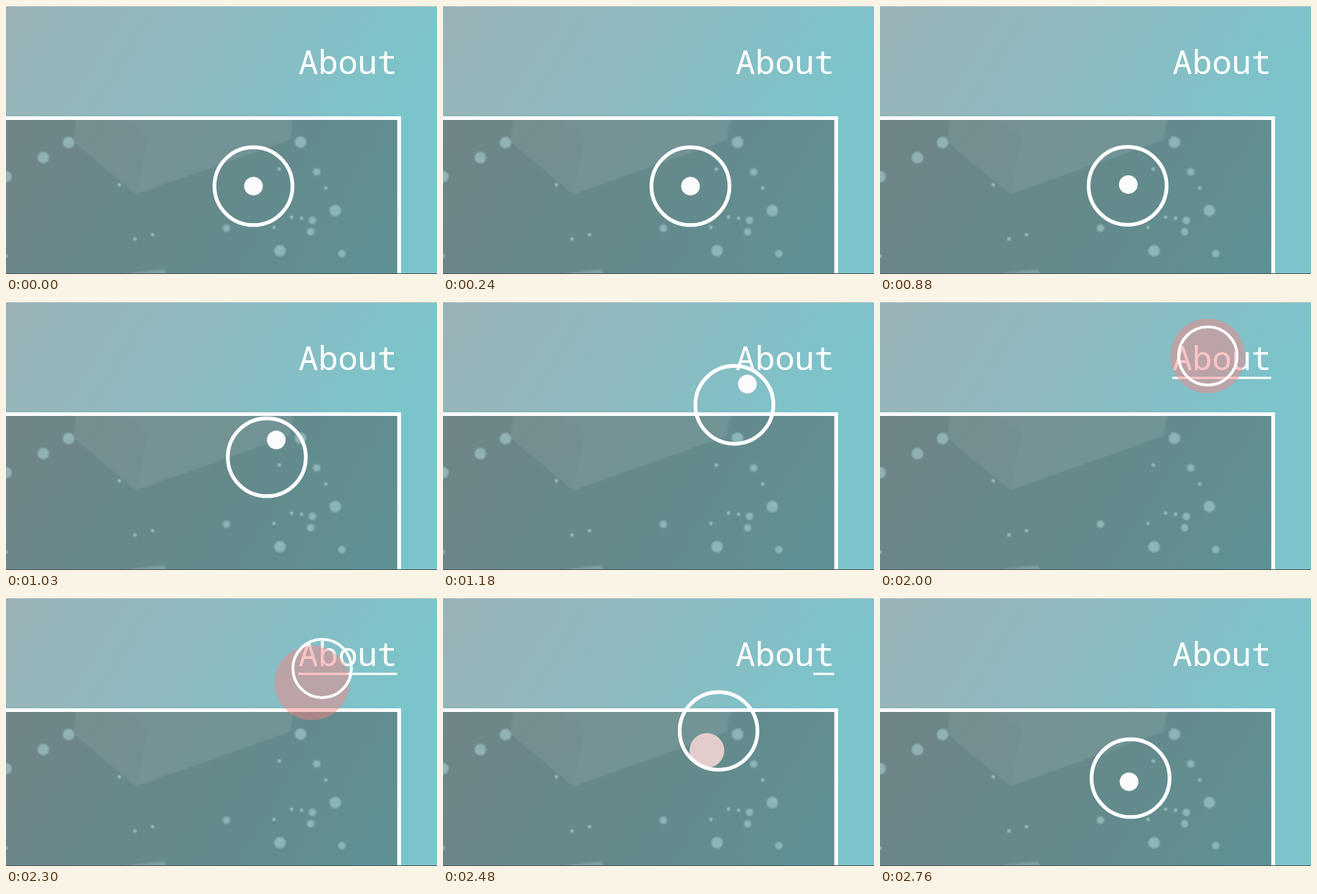
These frames come from a looping animation (600 by 374 pixels, 2790 ms). An HTML page:

```html
<!DOCTYPE html>
<html lang="en">
<head>
<meta charset="utf-8">
<title>About</title>
<style>
  html, body { margin: 0; width: 100%; height: 100%; overflow: hidden; }
  svg { display: block; width: 600px; height: 374px; }
  text { font: 400 45.8px "Noto Sans Mono", "DejaVu Sans Mono", monospace; fill: #fff; }
</style>
</head>
<body>
<svg viewBox="0 0 600 374" xmlns="http://www.w3.org/2000/svg">
  <defs>
    <linearGradient id="page" gradientUnits="userSpaceOnUse" x1="0" y1="0" x2="459" y2="286">
      <stop offset="0" stop-color="#9ab2b7"/>
      <stop offset=".55" stop-color="#8bbbc1"/>
      <stop offset="1" stop-color="#7cc4cb"/>
    </linearGradient>
    <linearGradient id="panel" gradientUnits="userSpaceOnUse" x1="0" y1="0" x2="552" y2="344">
      <stop offset="0" stop-color="#728385"/>
      <stop offset=".64" stop-color="#648a8c"/>
      <stop offset="1" stop-color="#5e9194"/>
    </linearGradient>
    <filter id="soft" x="-20%" y="-20%" width="140%" height="140%"><feGaussianBlur stdDeviation="1.2"/></filter>
    <filter id="hazy" x="-5%" y="-5%" width="110%" height="110%"><feGaussianBlur stdDeviation=".8"/></filter>
    <clipPath id="inside"><path d="M0 159H545V374H0z"/></clipPath>
  </defs>

  <rect width="600" height="374" fill="url(#page)"/>
  <rect width="545" height="215" y="159" fill="url(#panel)"/>
  <g clip-path="url(#inside)">
    <g fill="#fff" filter="url(#soft)">
      <path d="M98 150L94 190L181 263L197 182L150 150z" opacity=".065"/>
      <path d="M150 150L197 182L181 263L395 187L402 150z" opacity=".085"/>
      <path d="M160 375L169 373L220 367.5L225 376z" opacity=".18"/>
    </g>
    <g id="bubbles" filter="url(#hazy)"></g>
  </g>
  <path d="M0 156.5H547.3V376" fill="none" stroke="#fff" stroke-width="5.2"/>
  <rect width="600" height="1" fill="#c9cccd"/>
  <rect width="600" height="1" y="373" fill="#435254"/>

  <text x="407.2" y="95">About</text>
  <rect id="line" y="104.4" height="3" fill="#fff"/>
  <circle id="dot"/>
  <circle id="ring" r="54.3" fill="none" stroke="#fff" stroke-width="5.2"/>
</svg>
<script>
const LOOP = 2790, ENTER = 1230, LEAVE = 2325;
const REST = { x: 344.5, y: 251.4 }, LINK = { x: 456.4, y: 75.3 }, EXIT = { x: 344, y: 265.3 };
const $ = id => document.getElementById(id);
const mix = (a, b, p) => a + (b - a) * p;
const clamp = p => Math.min(1, Math.max(0, p));

// Bubbles: two sizes at fixed spots, plus randomly scattered specks
let seed = 7;
const random = () => (seed = seed * 16807 % 2147483647) / 2147483647;
const large = [[87, 190.5], [52, 211.5], [0, 238], [410, 190], [458.5, 285.5], [381.5, 341.5]];
const medium = [[432.5, 231.5], [426.5, 299], [424, 315], [467.5, 345.5], [306.8, 310]];
const specks = Array.from({ length: 9 }, () => [545 * random(), 220 + 140 * random()]);

const bubbles = (spots, r, opacity) => spots.map(([x, y]) =>
  `<circle cx="${x}" cy="${y}" r="${r}" fill="#a8d0d1" opacity="${opacity}"/>`).join('');
$('bubbles').innerHTML = bubbles(large, 8, .6) + bubbles(medium, 5.2, .6) + bubbles(specks, 2.2, .9);

const lead = p => 1 - (1 - p) ** 1.22;

// Glide up to the link, then swing back down with a long tail
function pointer(t) {
  if (t < 2040) {
    const u = clamp((t - 850) / 515), p = u * u * (3 - 2 * u);
    return [mix(REST.x, LINK.x, p), mix(REST.y, LINK.y, lead(p))];
  }
  const u = ((t - 2040) / 350) ** 4.17, p = u / (1 + u);
  return [mix(LINK.x, EXIT.x, lead(p)), mix(LINK.y, EXIT.y, p)];
}

// The ring trails the pointer with exponential lag
function follower(t) {
  const step = 6, keep = Math.exp(-step / 62);
  let [x, y] = pointer(t - 100 * step);
  for (let n = 99; n >= 0; n--) {
    const [px, py] = pointer(t - n * step);
    x = mix(px, x, keep);
    y = mix(py, y, keep);
  }
  return [x, y];
}

// cubic-bezier(.25, .1, .25, 1)
function ease(p) {
  if (p <= 0 || p >= 1) return clamp(p);
  const curve = (s, a, b) => 3 * a * s * (1 - s) ** 2 + 3 * b * s * s * (1 - s) + s ** 3;
  let lo = 0, hi = 1;
  for (let n = 0; n < 24; n++) {
    const mid = (lo + hi) / 2;
    if (curve(mid, .25, .25) < p) lo = mid; else hi = mid;
  }
  return curve(lo, .1, 1);
}

const hover = (t, ms) => t < LEAVE ? ease((t - ENTER) / ms) : 1 - ease((t - LEAVE) / ms);

function set(id, attrs) {
  for (const k in attrs) $(id).setAttribute(k, attrs[k]);
}

function draw(t) {
  const [x, y] = pointer(t), [rx, ry] = follower(t);
  const h = hover(t, 370), tint = mix(251, 130, h);
  set('dot', {
    cx: x, cy: y, r: mix(13, 52, h),
    fill: `rgb(${mix(251, 255, h)},${tint},${tint})`, 'fill-opacity': mix(1, .45, h)
  });
  set('ring', { transform: `translate(${rx} ${ry}) scale(${mix(1, .75, hover(t, 180))})` });

  const width = 137.5 * hover(t, 320);
  set('line', { x: t < LEAVE ? 407 : 544.5 - width, width });
}

const start = performance.now();
function tick(now) {
  draw(Math.max(0, now - start) % LOOP);
  requestAnimationFrame(tick);
}
draw(0);
requestAnimationFrame(tick);
</script>
</body>
</html>
```
